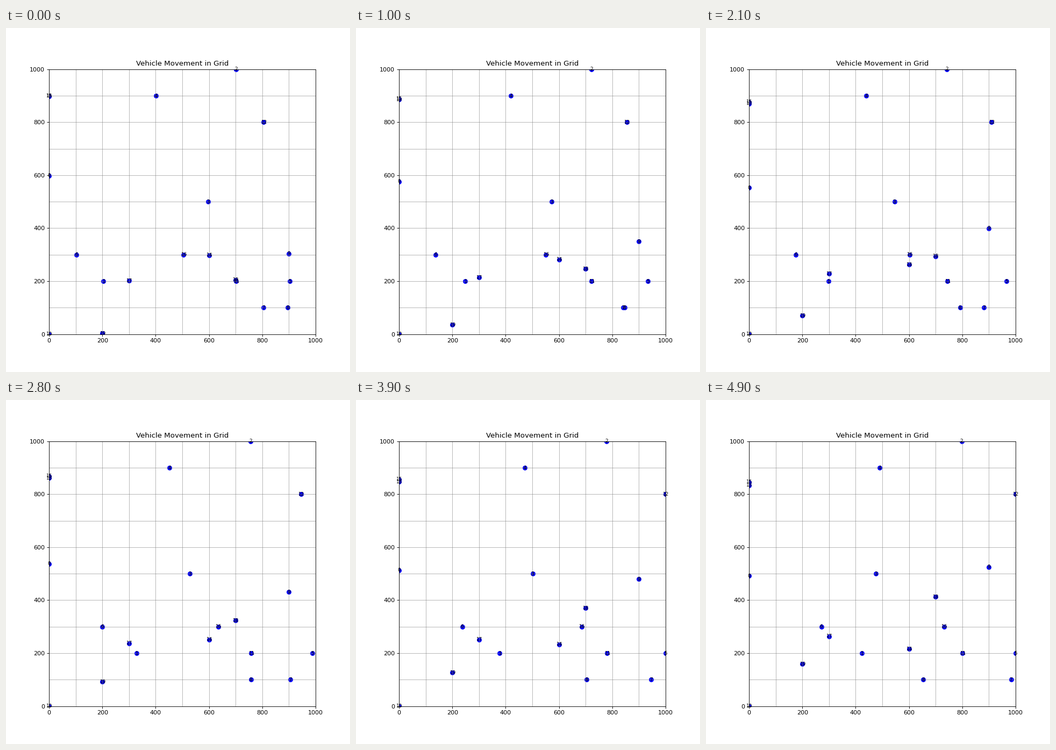
These frames come from a looping animation (640 px wide and 640 px high, 5000 ms). A matplotlib script:

```python
import matplotlib.pyplot as plt
import numpy as np
from matplotlib.animation import FuncAnimation

SIZE = 1000
FRAMES = 50
INTERVAL = 100

RIGHT, LEFT, UP, DOWN = (1, 0), (-1, 0), (0, 1), (0, -1)

# One vehicle per row, numbered from 0: start x, start y, heading, speed per frame
VEHICLES = [
    (0, 600, DOWN, 2.17),
    (200, 200, RIGHT, 4.45),
    (700, 1000, RIGHT, 1.95),
    (600, 500, LEFT, 2.47),
    (400, 900, RIGHT, 1.81),
    (900, 200, RIGHT, 3.03),
    (100, 300, RIGHT, 3.43),
    (800, 100, RIGHT, 3.66),
    (900, 100, LEFT, 4.92),
    (900, 300, UP, 4.50),
    (0, 0, DOWN, 2.00),
    (700, 200, RIGHT, 2.02),
    (800, 800, RIGHT, 5.00),
    (0, 900, DOWN, 1.335),
    (600, 300, DOWN, 1.685),
    (0, 900, DOWN, 1.09),
    (500, 300, RIGHT, 4.64),
    (300, 200, UP, 1.28),
    (700, 200, UP, 4.25),
    (200, 0, UP, 3.17),
]
starts = np.array([(x, y) for x, y, _, _ in VEHICLES], dtype=float)
velocities = np.array([np.multiply(heading, speed)
                       for _, _, heading, speed in VEHICLES])


def positions(frame):
    """Vehicles drive straight on and stop at the border."""
    return np.clip(starts + velocities * (frame + 1), 0, SIZE)


fig, ax = plt.subplots(figsize=(8, 8), dpi=80)
ax.set_xlim(0, SIZE)
ax.set_ylim(0, SIZE)
ax.set_title("Vehicle Movement in Grid")

for c in range(0, SIZE + 1, 100):
    ax.plot([c, c], [0, SIZE], color="gray", lw=0.5)
    ax.plot([0, SIZE], [c, c], color="gray", lw=0.5)

dots = ax.scatter(starts[:, 0], starts[:, 1], s=50, c="blue")
labels = [ax.text(x, y, str(i), fontsize=8, ha="center", va="center")
          for i, (x, y) in enumerate(starts)]


def update(frame):
    points = positions(frame)
    dots.set_offsets(points)
    for label, point in zip(labels, points):
        label.set_position(point)
    return [dots, *labels]


anim = FuncAnimation(fig, update, frames=FRAMES, interval=INTERVAL, repeat=True)
plt.show()
```
